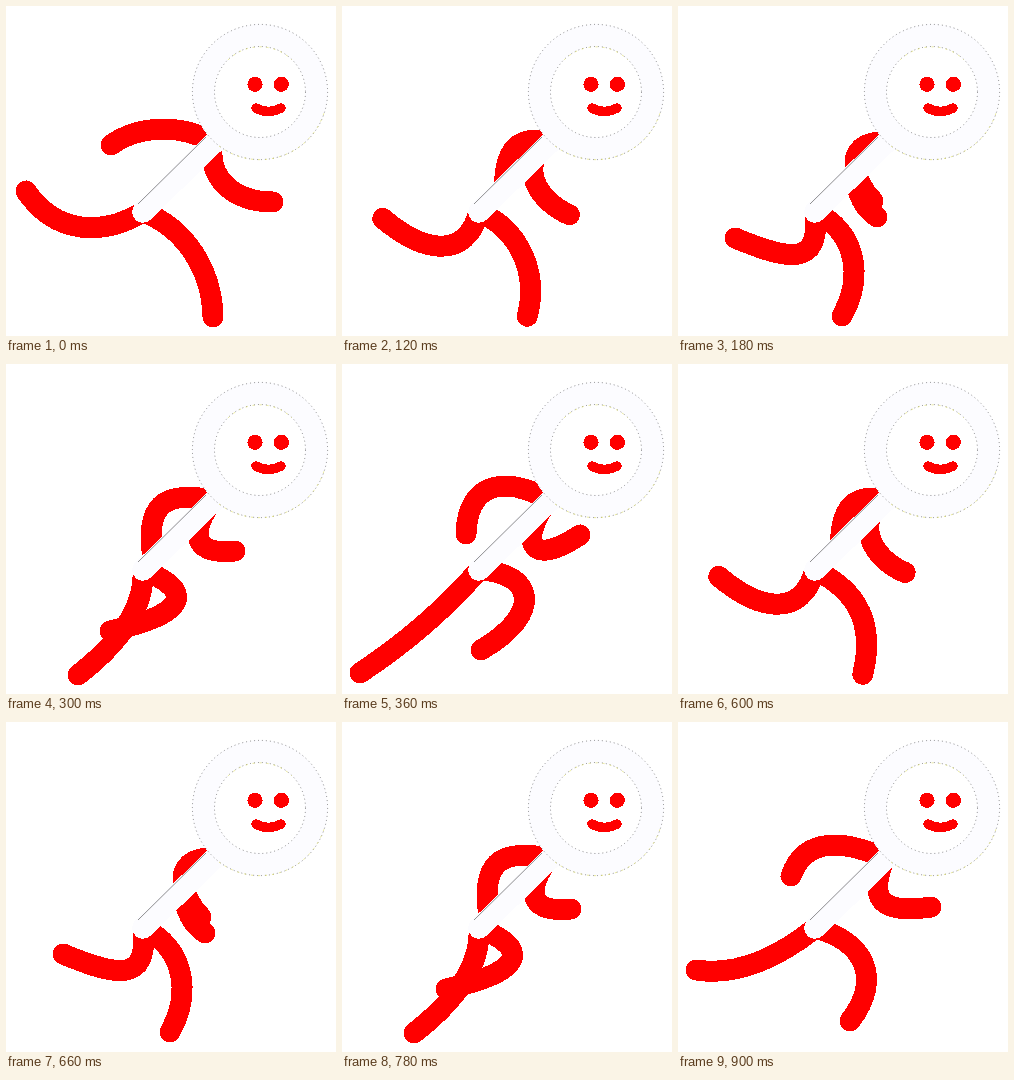
An HTML page that plays this animation: 330 px wide and 330 px high, repeating every 0.96 s.

```html
<!DOCTYPE html>
<html lang="en">
<head>
<meta charset="utf-8">
<title>Running magnifier</title>
<style>
  html, body { margin: 0; width: 100%; height: 100%; overflow: hidden; background: #fff; }
  svg { display: block; width: 100vw; height: 100vh; }
  .line { fill: none; stroke-linecap: round; }
  .red { stroke: #f00; stroke-width: 21; }
  .pale { stroke: #fcfcff; }
  .edge { fill: none; stroke-width: .6; shape-rendering: geometricPrecision; }
</style>
</head>
<body>
<svg viewBox="0 0 330 330" shape-rendering="crispEdges">
  <g id="limbs" class="line red"></g>
  <path class="line pale" stroke-width="21.5" d="M137 206L213 132"/>
  <circle cx="254" cy="86" r="56.6" fill="#fff" stroke="#fcfcff" stroke-width="22.4"/>
  <path class="edge" stroke="#444" d="M132 198L200 131"/>
  <g class="edge" stroke="#444" stroke-dasharray="1 3">
    <circle cx="254" cy="86" r="67.6"/>
    <circle cx="254" cy="86" r="45.5"/>
  </g>
  <g class="edge" stroke="#dd5" stroke-dasharray="2 5">
    <path d="M213 140A67.6 67.6 0 0 0 318 107"/>
    <path d="M222 54A45.5 45.5 0 0 1 286 54"/>
  </g>
  <g fill="#f00">
    <circle cx="249" cy="78.3" r="7.6"/>
    <circle cx="275.3" cy="78.3" r="7.6"/>
  </g>
  <path class="line" stroke="#f00" stroke-width="9.5" d="M250 102Q262 109 275 102"/>
</svg>
<script>
const STEP = 60, COUNT = 16;

// Each key: step, then two control points and the tip of a cubic curve.
const legKeys = [
  [0, 180, 222, 206, 265, 207, 311],
  [3, 178, 226, 186, 270, 164, 310],
  [5, 139, 245, 112, 280, 72, 311],
  [6, 102, 246, 62, 280, 18, 309],
  [7, 105, 232, 62, 255, 18, 248],
  [8, 97, 230, 50, 229, 20, 185],
  [11, 143, 262, 110, 254, 57, 232],
  [13, 178, 222, 196, 247, 104, 267],
  [14, 190, 208, 204, 248, 139, 286],
  [15, 186, 219, 205, 256, 172, 299]
];
const armKeys = [
  [0, 200, 172, 228, 196, 267, 196],
  [3, 165, 150, 175, 195, 199, 211],
  [5, 165, 128, 140, 135, 146, 187],
  [6, 170, 115, 126, 112, 124, 170],
  [7, 170, 120, 128, 112, 113, 154],
  [8, 175, 118, 133, 119, 105, 139],
  [11, 163, 135, 175, 175, 195, 195],
  [13, 188, 162, 180, 192, 229, 187],
  [14, 178, 172, 184, 207, 238, 171],
  [15, 195, 165, 190, 195, 253, 185]
];
const withFront = (keys, front) => [[0, ...front], ...keys.slice(1)];

const hip = [137, 206], shoulder = [207, 136];
const limbs = [
  { root: hip, shift: 0, keys: legKeys },
  { root: hip, shift: 8, keys: withFront(legKeys, [185, 232, 206, 250, 206, 311]) },
  { root: shoulder, shift: 0, keys: armKeys },
  { root: shoulder, shift: 8, keys: withFront(armKeys, [204, 167, 222, 196, 266, 195]) }
];

const group = document.getElementById("limbs");
for (const limb of limbs) {
  limb.path = document.createElementNS("http://www.w3.org/2000/svg", "path");
  group.append(limb.path);
}

// Key at any index, with steps continued around the cycle.
function keyAt(keys, i) {
  const n = keys.length, lap = Math.floor(i / n), key = keys[i - lap * n];
  return [key[0] + lap * COUNT, ...key.slice(1)];
}

// Tangent that never overshoots: zero at turning points.
function tangent(a, b, c, j) {
  const h0 = b[0] - a[0], h1 = c[0] - b[0];
  const s0 = (b[j] - a[j]) / h0, s1 = (c[j] - b[j]) / h1;
  if (s0 * s1 <= 0) return 0;
  const w0 = 2 * h1 + h0, w1 = h1 + 2 * h0;
  return (w0 + w1) / (w0 / s0 + w1 / s1);
}

function pose(keys, s) {
  let i = keys.length - 1;
  while (keys[i][0] > s) i--;
  const [a, b, c, d] = [-1, 0, 1, 2].map(k => keyAt(keys, i + k));
  const h = c[0] - b[0], u = (s - b[0]) / h, v = 1 - u;
  return [1, 2, 3, 4, 5, 6].map(j =>
    b[j] * v * v * (1 + 2 * u) + c[j] * u * u * (3 - 2 * u) +
    h * u * v * (v * tangent(a, b, c, j) - u * tangent(b, c, d, j)));
}

function draw(ms) {
  const step = Math.floor(ms / STEP) % COUNT;
  for (const { root, shift, keys, path } of limbs) {
    const p = pose(keys, (step + shift) % COUNT).map(x => x.toFixed(2));
    path.setAttribute("d", `M${root}C${p}`);
  }
}

const start = performance.now();
function tick() {
  draw(performance.now() - start);
  requestAnimationFrame(tick);
}
tick();
</script>
</body>
</html>
```
